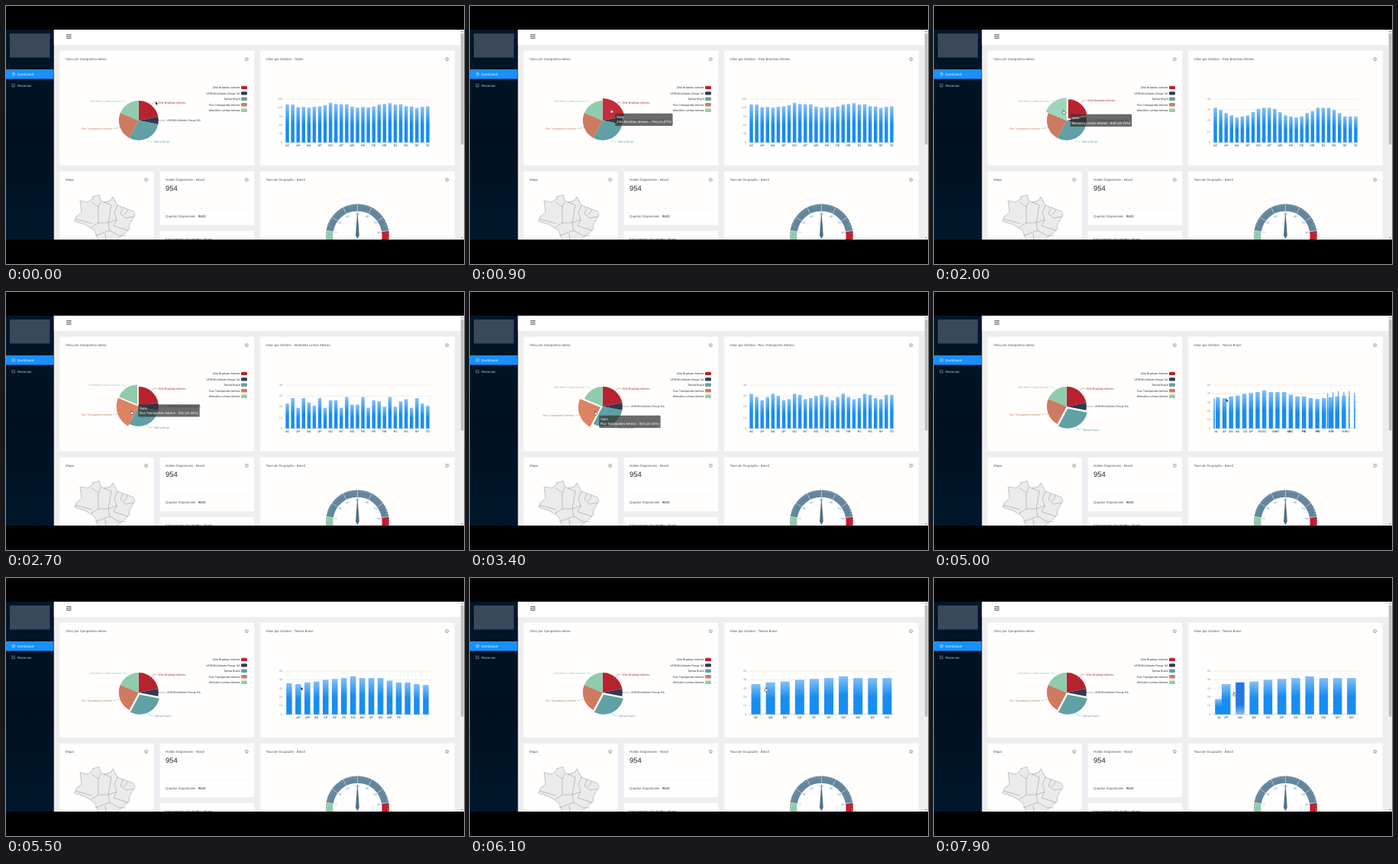
An HTML page for the animation above (8000 ms loop, 600 by 338 pixels).

```html
<!DOCTYPE html>
<html lang="pt">
<head>
<meta charset="utf-8">
<title>Dashboard</title>
<style>
html, body { margin: 0; width: 100%; height: 100%; overflow: hidden; background: #000; }
svg { display: block; width: 600px; height: 338px; }
text { font-family: "Liberation Sans", Arial, sans-serif; font-size: 3.78px; text-rendering: geometricPrecision; }
.ui text, .tip text { font-size: 4.375px; fill: #555; }
.ui .menu { fill: #fff; }
.ui .big { font-size: 9.4px; fill: #222; }
.tip text { fill: #fff; }
.icon { fill: none; stroke: #555; stroke-width: .5; }
.icon.light { stroke: #fff; }
.card { fill: #fffefd; }
.map { fill: #ebebeb; stroke: #777; stroke-width: .4; stroke-linejoin: round; }
.end { text-anchor: end; }
.mid { text-anchor: middle; }
</style>
</head>
<body>
<svg viewBox="0 0 600 338">
  <defs>
    <clipPath id="screen"><rect y="31" width="600" height="275"/></clipPath>
    <linearGradient id="bar" x2="0" y2="1">
      <stop stop-color="#83bff6"/><stop offset=".5" stop-color="#188df0"/><stop offset="1" stop-color="#188df0"/>
    </linearGradient>
    <linearGradient id="barHover" x2="0" y2="1">
      <stop stop-color="#2378e0"/><stop offset=".7" stop-color="#2378e0"/><stop offset="1" stop-color="#83bff6"/>
    </linearGradient>
    <linearGradient id="side" x2="0" y2="1">
      <stop stop-color="#00172b"/><stop offset=".5" stop-color="#001020"/><stop offset="1" stop-color="#00172b"/>
    </linearGradient>
  </defs>
  <rect width="600" height="338"/>
  <g clip-path="url(#screen)">
    <rect x="62.5" y="31" width="538" height="275" fill="#eeeef1"/>
    <rect x="62.5" y="31" width="532.8" height="20" fill="#fff"/>
    <rect y="31" width="62.5" height="275" fill="url(#side)"/>
    <rect x="5" y="36" width="52.5" height="31.5" fill="#3a4959"/>
    <rect y="83" width="62.5" height="12.5" fill="#1890ff"/>
    <rect x="595.3" y="31" width="4.7" height="275" fill="#f1f1f1"/>
    <rect x="595.9" y="36" width="3.5" height="145.5" fill="#bcbcbc"/>
    <path d="M596.4 34 597.6 32.6 598.8 34Z M596.4 303 597.6 304.4 598.8 303Z" fill="#666"/>
    <path d="M79 37.4h6.5M81.5 39h4M81.5 40.8h4M79 42.4h6.5" stroke="#333" stroke-width=".7"/>
    <path d="M80.6 38.6v2.6L78.8 39.9Z" fill="#333"/>
    <g class="card">
      <rect x="70.3" y="58.5" width="254.7" height="150.3"/>
      <rect x="333" y="58.5" width="254.7" height="150.3"/>
      <rect x="70.3" y="216.7" width="123.5" height="100"/>
      <rect x="201.6" y="216.7" width="123.4" height="70.4"/>
      <rect x="201.6" y="294.8" width="123.4" height="20"/>
      <rect x="333" y="216.7" width="254.7" height="100"/>
    </g>
    <path d="M209 265h108" stroke="#e8e8e8" stroke-width=".4"/>
    <g class="icon light">
      <circle cx="9.8" cy="89.3" r="1.9"/><path d="M9.8 90 10.6 88.4"/>
      <path opacity=".75" d="M11.5 103.6v2.2h-3.6v-3.6h2M9.6 104.2 12 101.8"/>
    </g>
    <g class="ui">
      <text class="menu" x="15" y="90.8">Dashboard</text>
      <text class="menu" x="15" y="105.5" opacity=".75">Reservas</text>
      <text x="78" y="71.2">Vôos por Companhia aérea</text>
      <text x="340.5" y="71.2" id="title"></text>
      <text x="78" y="229">Mapa</text>
      <text x="209" y="229">Hotéis Disponíveis - Brasil</text>
      <text x="340.5" y="229">Taxa de Ocupação - Brasil</text>
      <text class="big" x="209" y="242.4">954</text>
      <text x="209" y="277.4">Quartos Disponíveis</text>
      <text x="251.8" y="277.4" style="fill:#222">9623</text>
      <text x="209" y="307.2">Faturamento dos Hotéis - Brasil</text>
    </g>
    <g id="info" class="icon"></g>
    <g class="map">
      <path d="M97 255 107 257 114 252 113 250 122 247.5 124 255 128 257 137 255 140 250 146 261 167 269 169 274 162 285 161 293 145 307H121L116 294 103 286 90 282 92 276 99 270Z"/>
      <path fill="none" d="M91 279 113 285M112 257 121 263 124 257M121 263V284L112 290M128 257 138 261 134 284H121M146 261 142 271 145 280 134 284 136 294 117 301M153 264 150 272 157 278 167 276M160 266 155 274M145 280 141 288 160 294M136 294 148 301H157M130 298 131 307"/>
    </g>
    <g id="gauge"></g>
    <g id="pie"></g>
    <g id="legend"></g>
    <g id="bars"></g>
    <g class="tip" id="tip">
      <rect height="16.3" rx="1.2" fill="#323232" fill-opacity=".72"/>
      <text x="1.8" y="6.2">Voos</text><text id="tipText" x="1.8" y="12.8"></text>
    </g>
    <path id="arrow" d="M0 0V4.6L1.1 3.6 1.9 5.3 2.7 4.9 1.9 3.3H3.3Z" fill="#111" stroke="#fff" stroke-width=".25"/>
    <path id="hand" d="M-.5 0Q0-.6.5 0V1.8L2.3 2.2Q2.9 2.4 2.7 3.3L2.2 5H-.6L-1.8 3.1Q-1.7 2.3-.5 3Z" fill="#fff" stroke="#111" stroke-width=".45"/>
  </g>
</svg>
<script>
const $ = id => document.getElementById(id);
const LOOP = 8000;
const states = 'AC AL AP AM BA CE DF ES GO MA MT MS MG PA PB PR PE PI RR RO RJ RN RS SC SP SE TO'.split(' ');

// Flights per state follow a wave around a mean, with a slight ripple
const wave = (mean, amp, freq, peak) => i =>
  Math.round(mean + amp * Math.cos(freq * (i - peak)) + mean * .02 * Math.sin(i * i));

const airlines = [
  { name: 'Zelo Brazilian Airlines', color: '#b8222f', lift: '#c62c38', total: 756, flights: wave(28, 4.5, .6, 9.5) },
  { name: 'VORAN Airlines Group SA', color: '#2f3a4e', lift: '#3c485c', total: 216 },
  { name: 'Talvira Brazil', color: '#61a0a4', lift: '#6db0b4', total: 1026, flights: wave(39, 4, .4, 8.4) },
  { name: 'Rux Transportes Aéreos', color: '#cd7a62', lift: '#dd8263', total: 810, flights: wave(29.3, 2.8, 1.46, 17) },
  { name: 'Montelira Linhas Aéreas', color: '#91cbae', lift: '#9fd6bb', total: 648, flights: wave(24, 5, 2.4, .7) }
];
const TOTAL = airlines.reduce((sum, a) => sum + a.total, 0);

const visits = [
  { id: 0, hover: 250, click: 850 }, { id: 4, hover: 1940, click: 2100 },
  { id: 3, hover: 2550, click: 2900 }, { id: 2, hover: 3720, click: 3950, leave: 4250 }
];
visits.forEach((v, n) => v.leave = v.leave || visits[n + 1].hover);

// Bar chart views: data, axis maximum, first and last state shown
const lastVisit = airlines[2].flights;
const zoom = (at, lo, hi) => ({ at, flights: lastVisit, max: 50, lo, hi });
const views = [
  { at: -LOOP, flights: wave(128, 7, .62, 8.7), max: 150, lo: 0, hi: 26 },
  ...visits.map(v => ({ at: v.click + 100, flights: airlines[v.id].flights, max: v.id === 2 ? 50 : 40, lo: 0, hi: 26 })),
  zoom(4912, 1, 20), zoom(5250, 1, 16), zoom(5500, 2, 13), zoom(5750, 2, 11), zoom(7840, 1, 11)
];

// Pointer moves: start, end, x, y
const moves = [
  [0, 0, 196, 125], [100, 550, 185, 135], [1350, 1950, 169.5, 136.5], [2300, 2750, 164, 156],
  [3500, 3850, 180, 165], [4150, 4650, 382.5, 139.5], [5100, 5700, 387.5, 143.5], [6350, 7400, 393, 149.5]
];

const clamp = k => Math.min(1, Math.max(0, k));
const lerp = (a, b, k) => a + (b - a) * k;
const smooth = k => clamp(k) ** 2 * (3 - 2 * clamp(k));
const cubicOut = k => 1 - (1 - clamp(k)) ** 3;
const elasticOut = k => k <= 0 ? 0 : k >= 1 ? 1 : 1 + 2 ** (-10 * k) * Math.sin((k - .1) * 5 * Math.PI);
const pulse = (t, on, off, ease) => ease((t - on) / 300) - ease((t - off) / 300);

const pointer = t => moves.reduce(([x, y], [from, to, x1, y1]) => {
  const k = to > from ? smooth((t - from) / (to - from)) : 1;
  return [lerp(x, x1, k), lerp(y, y1, k)];
}, [0, 0]);

// Angles run clockwise from the top, in degrees
const polar = (cx, cy, r, deg) => [cx + r * Math.sin(deg * Math.PI / 180), cy - r * Math.cos(deg * Math.PI / 180)];
function sector(cx, cy, r0, r1, a0, a1) {
  const p = (r, a) => polar(cx, cy, r, a).map(v => v.toFixed(2)).join(' ');
  return `M${p(r0, a0)}L${p(r1, a0)}A${r1} ${r1} 0 0 1 ${p(r1, a1)}L${p(r0, a1)}A${r0} ${r0} 0 0 0 ${p(r0, a0)}Z`;
}
const label = (x, y, str, fill, cls = '') => `<text x="${x}" y="${y + 1.35}" fill="${fill}" class="${cls}">${str}</text>`;
const line = (a, b, color, w) => `<path d="M${a}L${b}" stroke="${color}" stroke-width="${w}"/>`;

function drawStatic() {
  const icon = (x, y) => `<circle cx="${x}" cy="${y}" r="2"/><path d="M${x} ${y - 1.1}v.5M${x} ${y - .2}v1.3"/>`;
  $('info').innerHTML = [315.3, 577.7].map(x => icon(x, 69.7) + icon(x, 227.5)).join('') + icon(183.7, 227.5);

  $('legend').innerHTML = airlines.map((a, i) => {
    const y = 106.9 + i * 7.45;
    return label(306.5, y, a.name, '#333', 'end') +
      `<rect x="308.1" y="${y - 2.2}" width="7.8" height="4.4" rx="1.2" fill="${a.color}"/>`;
  }).join('');

  const cx = 460.4, cy = 300.7, R = 41.5, band = 9.4;
  const zones = [[20, '#91c7ae'], [80, '#63869e'], [100, '#b9222f']];
  const angle = v => -135 + v * 2.7;
  let from = 0, g = '';
  for (const [to, color] of zones) {
    g += `<path d="${sector(cx, cy, R - band, R, angle(from), angle(to))}" fill="${color}"/>`;
    from = to;
  }
  for (let v = 0; v <= 100; v += 2) {
    const a = angle(v), major = v % 10 === 0;
    g += line(polar(cx, cy, R, a), polar(cx, cy, R - (major ? band : 2.5), a), '#eee', major ? .6 : .3);
    if (major) g += label(...polar(cx, cy, R - 13, a), v, zones.find(z => v <= z[0])[1], 'mid');
  }
  $('gauge').innerHTML = g + `<path d="M${cx} 267.5L${cx + 2.4} ${cy}L${cx} 305L${cx - 2.4} ${cy}Z" fill="#4d7288"/>`;
}

function drawPie(t) {
  let from = 0, out = '';
  airlines.forEach((a, i) => {
    const to = from + a.total / TOTAL * 360, mid = (from + to) / 2;
    const n = visits.findIndex(v => v.id === i), v = visits[n], next = visits[n + 1];
    const hover = v ? pulse(t, v.hover, v.leave, elasticOut) : 0;
    const picked = v ? pulse(t, v.click + 60, next ? next.click + 60 : LOOP, cubicOut) : 0;
    const [cx, cy] = polar(173.8, 150, 3.1 * picked, mid);
    const edge = polar(cx, cy, 26, mid), bend = polar(cx, cy, 30.7, mid);
    const dir = mid > 180 ? -1 : 1, tail = bend[0] + dir * 4.7;
    out += `<path d="M${edge}L${bend}H${tail}" fill="none" stroke="${a.color}" stroke-width=".4"/>` +
      `<path d="${sector(cx, cy, 0, 26 + 3.1 * hover, from, to)}" fill="${hover > .3 ? a.lift : a.color}"/>` +
      label(tail + dir * 1.3, bend[1], a.name, a.color, dir < 0 ? 'end' : '');
    from = to;
  });
  $('pie').innerHTML = out;
}

const X0 = 365, X1 = 556, BASE = 178.7, HEIGHT = 56.7;

function barIn({ flights, max, lo, hi }, i) {
  if (i < lo || i > hi) return null;
  const step = (X1 - X0) / (hi - lo + 1), mid = X0 + (i - lo + .5) * step, w = step * .63;
  return { mid, w, x: mid - w / 2, h: flights(i) / max * HEIGHT, named: step > 9 || (i - lo) % 2 === 0 };
}

function drawBars(t) {
  const n = views.filter(v => v.at <= t).length - 1, now = views[n], old = views[Math.max(0, n - 1)];
  const k = cubicOut((t - now.at) / 300), ticks = now.max === 40 ? 4 : 5;
  const hot = t >= 6400 ? 'AM' : '';
  let out = '';
  for (let j = 0; j <= ticks; j++) {
    const y = BASE - HEIGHT * j / ticks;
    out += line([X0, y], [X1, y], j ? '#d4d4d4' : '#999', .4) + label(362, y - .3, now.max / ticks * j, '#8d949c', 'end');
  }
  states.forEach((name, i) => {
    const a = barIn(old, i), b = barIn(now, i);
    if (!b && (!a || k === 1)) return;
    // Leaving bars get thinner, new ones grow from the axis
    const start = a || { ...b, h: 0 }, end = b || { ...a, w: 0 };
    const [x, w, h] = ['x', 'w', 'h'].map(p => lerp(start[p], end[p], k));
    out += `<rect x="${x}" y="${BASE - h}" width="${w}" height="${h}" fill="url(#${name === hot ? 'barHover' : 'bar'})"/>`;
    if (b && b.named) out += label(a && a.named ? lerp(a.mid, b.mid, k) : b.mid, 182.5, name, '#222', 'mid');
  });
  $('bars').innerHTML = out;
}

function drawPointer(t) {
  const hand = t > 250 && t < 4250 || t > 5600;
  $('arrow').style.display = hand ? 'none' : '';
  $('hand').style.display = hand ? '' : 'none';
  $(hand ? 'hand' : 'arrow').setAttribute('transform', `translate(${pointer(t)})`);

  const v = visits.find(v => t >= v.hover && t < v.leave);
  $('tip').style.display = v ? '' : 'none';
  if (!v) return;
  const { name, total } = airlines[v.id], [x, y] = pointer(t - 250);
  const percent = Math.floor(total / TOTAL * 1e4 + .49) / 100;
  $('tipText').textContent = `${name} - ${total} (${percent}%)`;
  $('tip').setAttribute('transform', `translate(${x + 5.2} ${y + 5.7})`);
  $('tip').firstElementChild.setAttribute('width', $('tipText').getComputedTextLength() + 3.6);
}

const start = performance.now();
function frame() {
  const t = (performance.now() - start) % LOOP;
  const v = visits.filter(v => v.click <= t).pop();
  $('title').textContent = 'Vôos por Destino - ' + (v ? airlines[v.id].name : 'Todos');
  drawPie(t);
  drawBars(t);
  drawPointer(t);
  requestAnimationFrame(frame);
}
drawStatic();
frame();
</script>
</body>
</html>
```
